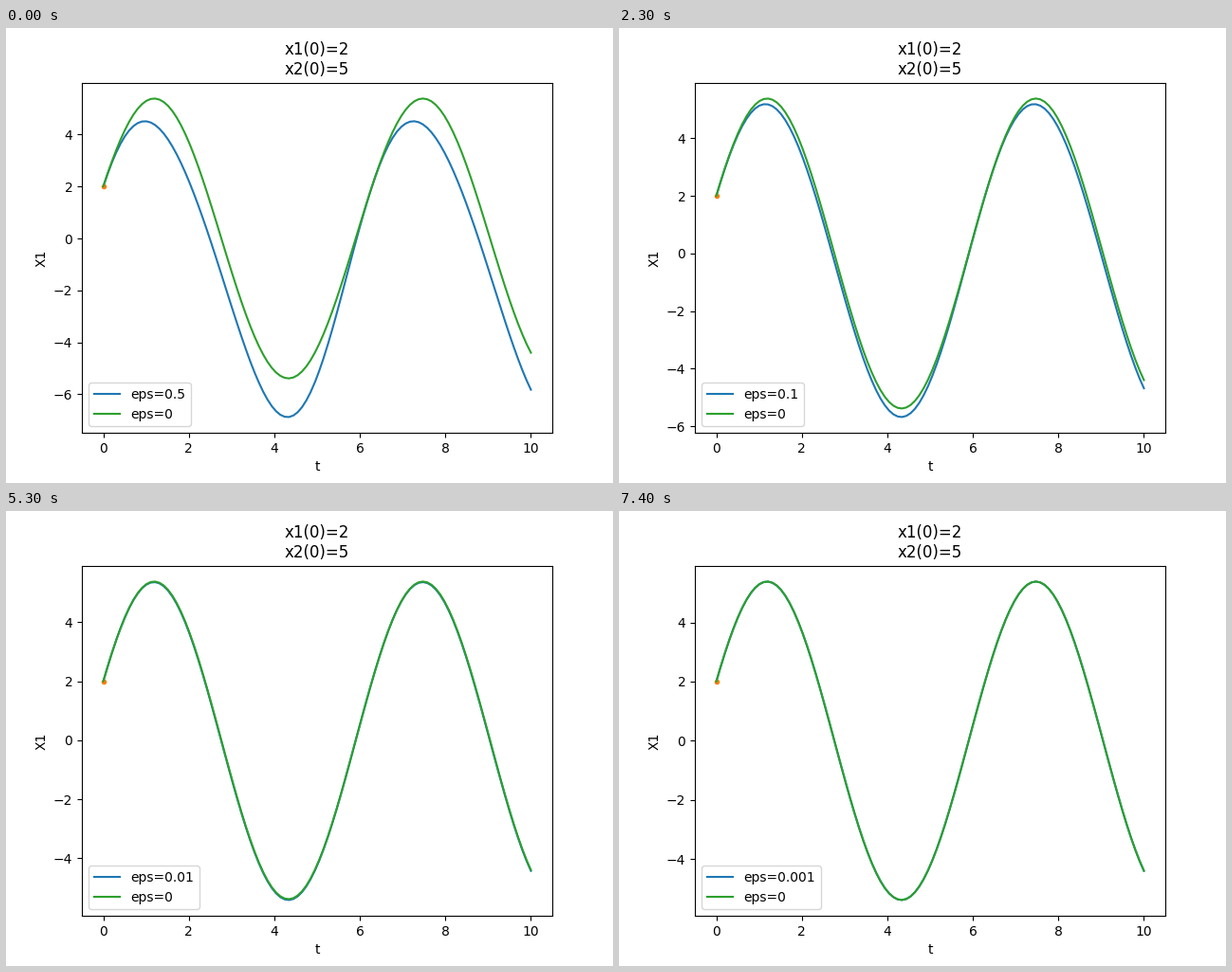
A matplotlib script that plays this animation: 640x480 px, repeating every 8000 ms.

```python
import numpy as np
import matplotlib.pyplot as plt
from matplotlib.animation import FuncAnimation

STEP_MS = 500
# (eps, number of steps it stays on screen)
STAGES = [(0.5, 1), (0.1, 6), (0.01, 6), (0.001, 3)]
SCHEDULE = [eps for eps, steps in STAGES for _ in range(steps)]

X1_0, X2_0 = 2, 5
t = np.linspace(0, 10, 100)


def solution(eps):
    """Solve x'' + x = -eps * (2 cos t)^2 with x(0) = 2, x'(0) = 5."""
    free = X1_0 * np.cos(t) + X2_0 * np.sin(t)
    forced = -2 * (1 - np.cos(t)) - 2 / 3 * (np.cos(t) - np.cos(2 * t))
    return free + eps * forced


fig, ax = plt.subplots(figsize=(6.4, 4.8), dpi=100)


def update(i):
    eps = SCHEDULE[i]
    ax.clear()
    ax.plot(t, solution(eps), color="C0", label=f"eps={eps}")
    ax.plot(0, X1_0, ".", color="C1")
    ax.plot(t, solution(0), color="C2", label="eps=0")
    ax.set_title(f"x1(0)={X1_0}\nx2(0)={X2_0}")
    ax.set_xlabel("t")
    ax.set_ylabel("X1")
    ax.legend(loc="lower left")
    return ax.get_children()


anim = FuncAnimation(fig, update, frames=len(SCHEDULE), interval=STEP_MS,
                     repeat=True, repeat_delay=0, blit=False)
plt.show()
```
